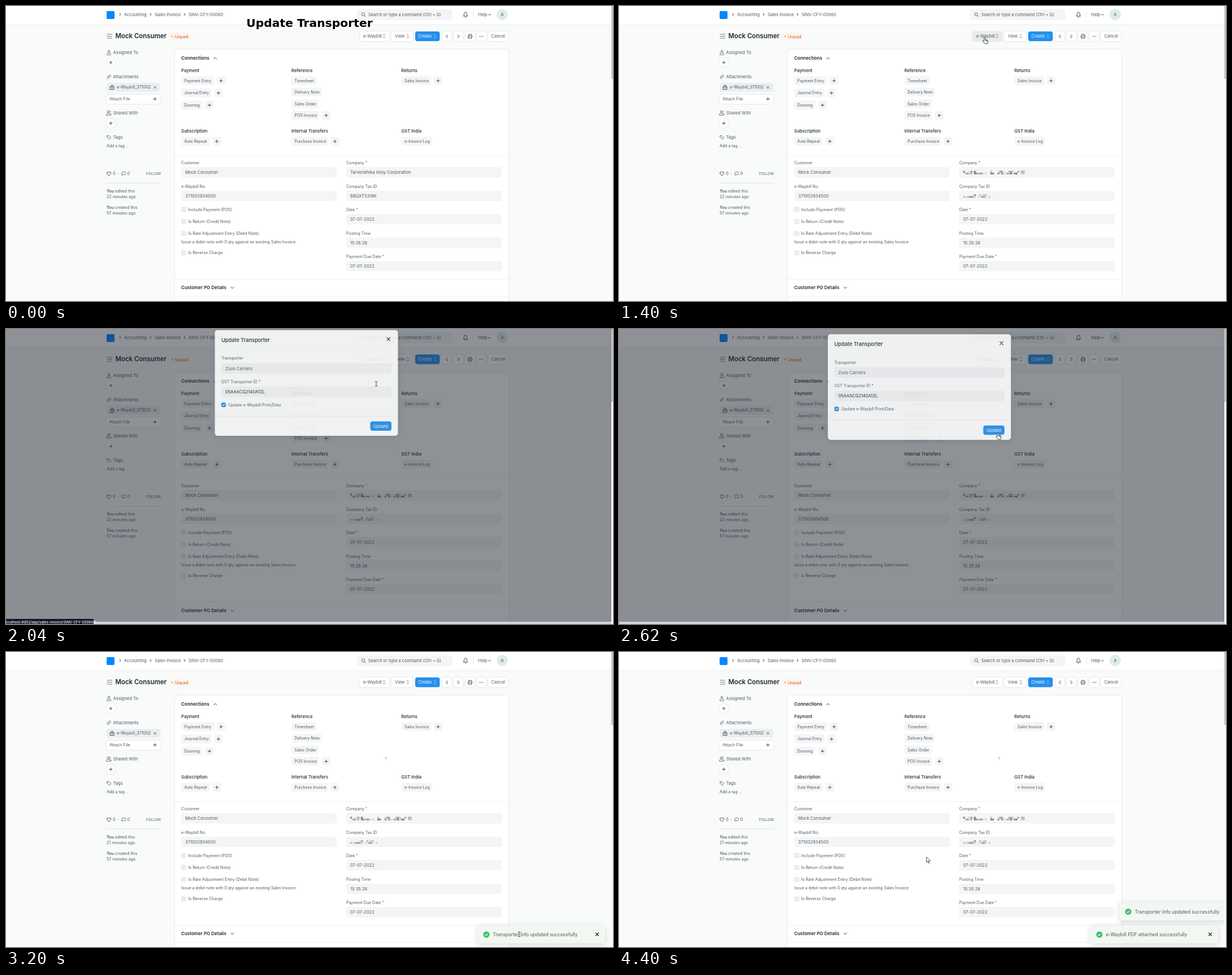
Animation of 1074x522 px, one loop 4420 ms. Source, as an HTML page:

```html
<!DOCTYPE html>
<html lang="en">
<head>
<meta charset="utf-8">
<title>Update Transporter</title>
<style>
html, body { margin: 0; width: 100%; height: 100%; overflow: hidden; background: #f9fafa; }
svg { display: block; width: 1074px; height: 522px; font-family: Inter, sans-serif; }
text { white-space: pre; }
.soft { filter: drop-shadow(0 .6px 1px rgba(20, 30, 40, .18)); }
.lift { filter: drop-shadow(0 2px 5px rgba(20, 30, 40, .16)); }
</style>
</head>
<body>
<svg id="stage" viewBox="0 0 1074 522" xmlns="http://www.w3.org/2000/svg"></svg>
<script>
const INK = '#1f272e', DIM = '#505a62', GREY = '#f4f5f6', BLUE = '#2490ef';

// Markup helpers; text is placed by its vertical centre.
const rect = (x, y, w, h, fill, r = 0, more = '') =>
  `<rect x="${x}" y="${y}" width="${w}" height="${h}" rx="${r}" fill="${fill}" ${more}/>`;
const text = (x, cy, str, size = 7.4, fill = INK, weight = 400, more = '') =>
  `<text x="${x}" y="${cy + size * .36}" font-size="${size}" fill="${fill}" font-weight="${weight}" ${more}>${str}</text>`;
const line = (d, color = INK, w = .9, fill = 'none') =>
  `<path d="${d}" stroke="${color}" stroke-width="${w}" fill="${fill}" stroke-linecap="round" stroke-linejoin="round"/>`;
const circle = (x, y, r, fill, more = '') => `<circle cx="${x}" cy="${y}" r="${r}" fill="${fill}" ${more}/>`;
const group = (id, body, more = '') => `<g id="${id}" ${more}>${body}</g>`;
const plus = (x, y, r = 2.6) => line(`M${x - r} ${y}h${2 * r}M${x} ${y - r}v${2 * r}`, INK, .8);
const cross = (x, y, r, w = 1) => line(`M${x - r} ${y - r}l${2 * r} ${2 * r}m0 ${-2 * r}l${-2 * r} ${2 * r}`, INK, w);
const right = (x, y, r = 1.8) => line(`M${x - r / 2} ${y - r}l${r} ${r}l${-r} ${r}`, INK, 1);
const left = (x, y, r = 1.8) => line(`M${x + r / 2} ${y - r}l${-r} ${r}l${r} ${r}`, INK, 1);
const caret = (x, y, s = 1, r = 2.6) => line(`M${x - r} ${y - s * r / 2}l${r} ${s * r}l${r} ${-s * r}`, INK, .9);
const sorter = (x, y, color = INK) => line(`M${x - 1.5} ${y - 1.5}l1.5 -1.5l1.5 1.5m-3 3l1.5 1.5l1.5 -1.5`, color, .7);
const button = (x, w, fill = '#fff', id = '') =>
  rect(x, 45, w, 17.3, fill, 4, `class="soft" ${id && `id="${id}"`}`);
const tick = (x, y, r) => line(`M${x - r} ${y}l${r * .7} ${r * .7}l${r * 1.2} ${-r * 1.4}`, '#fff', 1.1);
const person = (x, y) => circle(x, y - 2, 1.7, 'none', `stroke="${DIM}" stroke-width=".8"`) +
  line(`M${x - 3.3} ${y + 4}v-1.2q0 -1.8 2 -1.8h2.6q2 0 2 1.8v1.2z`, DIM, .8);

const navbar = () => rect(0, 0, 1071, 33, '#fff') + rect(0, 32.5, 1071, 1, '#ebeef0') +
  rect(178, 9, 14, 14, '#0089ff', 2) +
  [202, 256, 316].map(x => right(x, 15)).join('') +
  text(209, 15, 'Accounting', 7.4, DIM) + text(263, 15, 'Sales Invoice', 7.4, DIM) +
  text(323, 15, 'SINV-CFY-00060', 7.4, DIM) +
  rect(621, 6, 169, 19, GREY, 4) +
  circle(632, 14.7, 2.7, 'none', `stroke="${DIM}" stroke-width=".9"`) + line('M634 17l2 2', DIM) +
  text(641, 15, 'Search or type a command (Ctrl + G)', 7.4, DIM) +
  line('M809.5 17.5q1.2 -1 1.2 -4q0 -2.6 2.3 -2.6t2.3 2.6q0 3 1.2 4zM812 19.5h2', INK, .8) +
  rect(826, 10, .7, 11, '#dfe3e6') +
  text(835.5, 15, 'Help', 7.4, DIM) + caret(855.5, 15.5, 1, 1.8) +
  circle(878, 15, 10, '#dfece7') + text(878, 15, 'A', 8, '#3c5f52', 400, 'text-anchor="middle"');

const titleBar = () => [50, 53.5, 57].map(y => line(`M179 ${y}h8.5`, DIM, .8)).join('') +
  text(193.5, 53, 'Mock Consumer', 11.4, INK, 600) +
  rect(288, 47.5, 38.5, 13, '#fff4ec', 5) + circle(294, 54, 1, '#c45a22') + text(299, 54, 'Unpaid', 7, '#b8602c') +
  button(626, 52, '#fff', 'waybill') + text(632, 53.5, 'e-Waybill', 7.5, DIM) + sorter(669, 53.5) +
  button(682, 38) + text(688, 53.5, 'View', 7.5, DIM) + sorter(711, 53.5) +
  rect(724, 45, 43.5, 17.3, BLUE, 4) + text(729.5, 53.5, 'Create', 7.5, '#fff') + sorter(759, 53.5, '#fff') +
  [772, 792.5, 813, 833].map(x => button(x, 16)).join('') + left(780, 53.7, 2.6) + right(800.5, 53.7, 2.6) +
  line('M818.8 52v-2h4.6v2M818.8 55.7h-1.3v-3.7h7.2v3.7h-1.3M818.8 54.5h4.6v3h-4.6z', INK, .65) +
  [838.3, 841, 843.7].map(x => circle(x, 53.7, .7, INK)).join('') +
  button(853, 35.5) + text(858.5, 53.5, 'Cancel', 7.5, DIM);

const sidebar = () => {
  const add = y => circle(185.5, y, 8, '#fff', 'class="soft"') + plus(185.5, y);
  return person(182, 82) + text(189.5, 82, 'Assigned To', 7.6, DIM) + add(100) +
    line('M179 126l3.5 -3.5q1.5 -1 2.5 0t0 2.3l-3.5 3.5q-1 .7 -1.7 0t0 -1.5l3 -3', DIM, .8) +
    text(189.5, 125, 'Attachments', 7.6, DIM) + rect(178, 136, 95.5, 15.5, '#ebeef0', 4) +
    line('M184.5 143h6.5v4.5h-6.5zM186 143v-1.2q0 -1.8 1.8 -1.8t1.8 1.8v1.2M187.8 144.7v1', INK, .8) +
    text(196, 143.5, 'e-Waybill_371002', 7.3, DIM) + cross(263.5, 144, 1.9, .7) +
    rect(178, 156.5, 95.5, 16.5, '#fff', 4, 'class="soft"') + text(183, 164.5, 'Attach File', 7.3, DIM) + plus(263.5, 164.5) +
    person(181, 189) + line('M184 185.5q2 1.2 0 3M185 190q1.3 .5 1.3 3', DIM, .8) +
    text(189.5, 189, 'Shared With', 7.6, DIM) + add(207.5) +
    line('M179 229.5h3.5l3.5 3.5l-3 3l-4 -3.5z', DIM, .8) + circle(180.8, 231.2, .6, DIM) +
    text(189.5, 232.5, 'Tags', 7.6, DIM) + text(178, 247.5, 'Add a tag ...', 7, DIM) +
    line('M182 300l-3 -3q-1.5 -3 1 -3.5q1.5 0 2 1.2q.6 -1.2 2 -1.2q2.5 .5 1 3.5z', INK, .8) + text(189, 296.5, '0', 7.4, DIM) +
    circle(198.5, 296.5, .6, DIM) + line('M205 299v-3.5q0 -2 2 -2h2.5q2 0 2 2v1q0 2 -2 2h-2.5z', DIM, .8) +
    text(214.5, 296.5, '0', 7.4, DIM) + text(248, 296.5, 'FOLLOW', 6.2, DIM) + rect(178, 313, 95.5, 1, '#dfe3e6') +
    text(178, 327.5, '<tspan font-weight="600">You</tspan> edited this', 7.1, DIM) +
    text(178, 337.5, '22 minutes ago', 7.1, DIM, 400, 'id="edited"') +
    text(178, 356.5, '<tspan font-weight="600">You</tspan> created this', 7.1, DIM) +
    text(178, 366.5, '57 minutes ago', 7.1, DIM);
};

const chip = ([x, y, w, label, plusX]) => rect(x, y - 7.7, w, 15.4, GREY, 4) + text(x + 5.5, y, label, 6.95, DIM) +
  (plusX ? rect(plusX - 7.7, y - 7.7, 15.4, 15.4, GREY, 4) + plus(plusX, y + .3) : '');
const field = (x, y, label, value, id = '') =>
  text(x, y, label.replace('*', '<tspan fill="#e24c4c">*</tspan>'), 7, DIM) +
  rect(x, y + 7.5, 275, 18.5, GREY, 4) + text(x + 7, y + 17, value, 7.5, DIM, 400, id && `id="${id}"`);
const check = (y, label) => rect(310.5, y - 3.7, 7.5, 7.5, '#f0f1f2', 2, 'stroke="#cfd4d9" stroke-width=".8"') +
  text(322.5, y, label, 7.1, DIM);

const card = () => rect(299, 77, 590, 460, '#fff', 5, 'class="soft"') +
  text(310, 92, 'Connections', 8.1, INK, 600) + caret(370, 92.5, -1) +
  [[310, 114, 'Payment'], [505, 114, 'Reference'], [699.5, 114, 'Returns'], [310, 221.5, 'Subscription'],
   [505, 221.5, 'Internal Transfers'], [699.5, 221.5, 'GST India']].map(([x, y, s]) => text(x, y, s, 7.7, INK, 500)).join('') +
  [[310, 132, 58.5, 'Payment Entry', 380.5], [310, 153.7, 53.5, 'Journal Entry', 376], [310, 175.2, 37.5, 'Dunning', 360],
   [505, 132, 45, 'Timesheet'], [505, 152.5, 54, 'Delivery Note'], [505, 173, 48.5, 'Sales Order'],
   [505, 193.3, 49, 'POS Invoice', 566.5], [699.5, 132, 53, 'Sales Invoice', 764.5], [310, 239.3, 50.5, 'Auto Repeat', 373],
   [505, 239.3, 65, 'Purchase Invoice', 582], [699.5, 239.3, 54.5, 'e-Invoice Log']].map(chip).join('') +
  [264, 483, 513].map(y => rect(299, y, 590, .8, '#ebeef0')).join('') +
  field(310, 277.5, 'Customer', 'Mock Consumer') + field(310, 319.2, 'e-Waybill No.', '371002934500') +
  field(602, 277.5, 'Company *', 'Tarvendhika Alloy Corporation', 'company') +
  field(602, 319.2, 'Company Tax ID', 'BBQXT5319K', 'tax') +
  field(602, 360.5, 'Date *', '07-07-2022') + field(602, 402.2, 'Posting Time', '15:35:28') +
  field(602, 443.5, 'Payment Due Date *', '07-07-2022') +
  check(360, 'Include Payment (POS)') + check(381.3, 'Is Return (Credit Note)') +
  check(402.5, 'Is Rate Adjustment Entry (Debit Note)') +
  text(310, 417.7, 'Issue a debit note with 0 qty against an existing Sales Invoice', 7, DIM) +
  check(436.8, 'Is Reverse Charge') +
  text(310, 498, 'Customer PO Details', 8, INK, 600) + caret(400.5, 498.5);

// Pixelated cover for the two private values: a sparse row above a dense one.
let seed = 29;
const random = () => (seed = seed * 16807 % 2147483647) / 2147483647;
const mosaic = (x0, y0, cols, dark) => {
  let out = '';
  for (let i = 0; i < cols; i++) for (let j = 0; j < 2; j++) {
    if (random() > [.3, .8][j]) continue;
    const v = 228 - random() * dark;
    out += rect(x0 + i * 3.2, y0 + j * 3.2, 3.2, 3.2, `rgb(${v + 4},${v},${v + 3})`);
  }
  return out;
};

const menu = () => rect(570, 66, 108, 62, '#fff', 5, 'class="lift"') + rect(573, 88.5, 102, 18, GREY, 3) +
  ['Update Vehicle Info', 'Update Transporter', 'Cancel'].map((s, i) => text(579, 79 + i * 18.5, s, 7.5)).join('');

const modal = () => rect(369.5, 0, 324, 187, '#fff', 5, 'class="lift"') +
  text(381, 18, 'Update Transporter', 9.2, INK, 500) + cross(676.7, 16, 2.8, 1.1) +
  text(381, 50, 'Transporter', 7, DIM) + rect(381, 58.5, 301, 18.5, GREY, 4) + text(388, 68, 'Zuvo Carriers', 7.5, DIM) +
  text(381, 91.5, 'GST Transporter ID *', 7, DIM) + rect(381, 100, 301, 18.5, GREY, 4) + text(388, 109, '05AAACG2140A1ZL', 7.5) +
  rect(381, 128.3, 8, 8, BLUE, 2) + tick(385, 132.4, 2) + text(393.5, 132.2, 'Update e-Waybill Print/Data', 7.1, DIM) +
  rect(369.5, 152, 324, .8, '#ebeef0') +
  rect(644.5, 161.7, 37.5, 16.5, BLUE, 4) + text(663.2, 170, 'Update', 7.7, '#fff', 400, 'text-anchor="middle"');

const toast = (id, label) => group(id, rect(834, 484, 226, 31.5, '#f1f8f2', 5, 'class="lift"') +
  circle(850, 500, 5.6, '#48bb74') + tick(850, 500.3, 2.4) + text(861.5, 500, label, 8.35, DIM) + cross(1046, 499.5, 2.5, 1.2));

const stage = document.getElementById('stage');
stage.innerHTML = rect(0, 0, 1074, 522, '#f9fafa') + navbar() + titleBar() + sidebar() + card() +
  group('cover', mosaic(609, 291.6, 34, 110) + mosaic(609, 333, 15, 80)) +
  group('speck', line('M672 189.5v-4M672.2 187.6q1.6 -.8 1.6 1.9', '#8d949a', .6)) +
  group('menu', menu()) +
  group('shade', rect(0, 0, 1071, 518, 'rgba(31,39,46,.5)') + rect(0, 518, 1071, 4, '#d3d6de')) +
  group('modal', modal()) +
  `<clipPath id="view"><path d="M0 0h1071v522h-1071z"/></clipPath>` +
  group('toasts', toast('first', 'Transporter Info updated successfully') +
    toast('second', 'e-Waybill PDF attached successfully'), 'clip-path="url(#view)"') +
  rect(1071, 0, 3, 522, '#f8f8f8') + rect(1071, 0, 3, 129, '#c4c5c7') +
  group('status', rect(-2, 513, 157, 10, '#14142b', 1) +
    text(-2, 518.7, 'localhost:8002/app/sales-invoice/SINV-CFY-00060#', 6.3, '#fff', 500)) +
  text(537, 29.8, 'Update Transporter', 20.3, '#000', 700,
    'id="title" text-anchor="middle" font-family="DejaVu Sans, sans-serif"') +
  group('arrow', line('M0 0v9.2l2.1 -2l1.5 3.4l1.5 -.7l-1.5 -3.2h2.9z', '#222', .8, '#fff')) +
  group('hand', line('M-1 .8q1 -1.6 2 0v4l4 .8q1 .4 .8 2l-.8 4h-5l-3.4 -4.4q0 -1.4 1.2 -1l1.2 1zM2.6 5.2v2M4.2 5.5v2', '#222', .8, '#fff')) +
  group('beam', line('M-1.8 -4h1.3l.5 .6l.5 -.6h1.3M0 -3.4v6.8M-1.8 4h1.3l.5 -.6l.5 .6h1.3', '#222', .8));

const el = id => document.getElementById(id);
const show = (id, on) => el(id).style.display = on ? '' : 'none';
const move = (id, x, y) => el(id).setAttribute('transform', `translate(${x} ${y})`);
const ramp = (t, a, b) => Math.min(1, Math.max(0, (t - a) / (b - a)));
const easeOut = p => 1 - (1 - p) ** 1.75;

// Pointer path: time, x, y.
const path = [[600, 1024, 505], [780, 1024, 505], [800, 1004, 483], [980, 1004, 483], [1000, 985, 465], [1180, 985, 465],
  [1380, 647, 55], [1600, 647, 55], [1720, 653.5, 96.5], [1980, 653.5, 96.5], [2040, 655, 97], [2180, 655, 97],
  [2480, 670.5, 183.5], [3040, 670.5, 183.5], [3180, 885, 500], [3200, 908, 499.5], [3320, 965, 501], [3480, 1000, 502],
  [3720, 1000, 502], [4000, 1042, 499], [4300, 1046, 497], [4400, 544, 363]];
// Pointer shape from each time on.
const shapes = [[600, 'arrow'], [1380, 'hand'], [1960, 'arrow'], [2020, 'beam'], [2240, 'arrow'], [2440, 'hand'],
  [3060, 'arrow'], [3180, 'beam'], [3760, 'arrow'], [3980, 'hand'], [4320, 'arrow']];

function pointer(t) {
  const shape = shapes.filter(s => s[0] <= t).pop();
  for (const name of ['arrow', 'hand', 'beam']) show(name, shape && shape[1] === name);
  if (!shape) return;
  const i = Math.max(1, path.findIndex(k => k[0] >= t));
  const [a, b] = [path[i - 1], path[i]], p = ramp(t, a[0], b[0]);
  move(shape[1], a[1] + (b[1] - a[1]) * p, a[2] + (b[2] - a[2]) * p);
}

function draw(t) {
  show('title', t < 1200);
  const covered = t >= 200;
  show('cover', covered);
  show('company', !covered);
  show('tax', !covered);
  el('waybill').setAttribute('fill', t >= 1380 && t < 1960 ? '#e9ebed' : '#fff');
  show('menu', t >= 1600 && t < 1960);
  show('status', t >= 1680 && t < 2120);
  el('shade').style.opacity = ramp(t, 1965, 2002) - ramp(t, 2645, 2682);
  el('modal').style.opacity = ramp(t, 2012, 2044) - ramp(t, 2615, 2652);
  const rise = 1 - easeOut(ramp(t, 2015, 2092)) + easeOut(ramp(t, 2607, 2684));
  move('modal', 0, 18 - 32 * rise);
  el('edited').textContent = `${t < 3040 ? 22 : 21} minutes ago`;
  show('speck', t >= 3060);
  show('first', t >= 3060);
  move('first', 240 * (1 - easeOut(ramp(t, 3060, 3140))) + 51 * ramp(t, 4300, 4400) ** 2, t < 3740 ? 0 : -40.5);
  show('second', t >= 3740);
  move('second', 240 * (1 - easeOut(ramp(t, 3720, 3820))), 0);
  pointer(t);
}

const start = performance.now();
function animate() {
  const t = (performance.now() - start) % 4420;
  draw(Math.floor(t / 20) * 20);
  requestAnimationFrame(animate);
}
animate();
</script>
</body>
</html>
```
